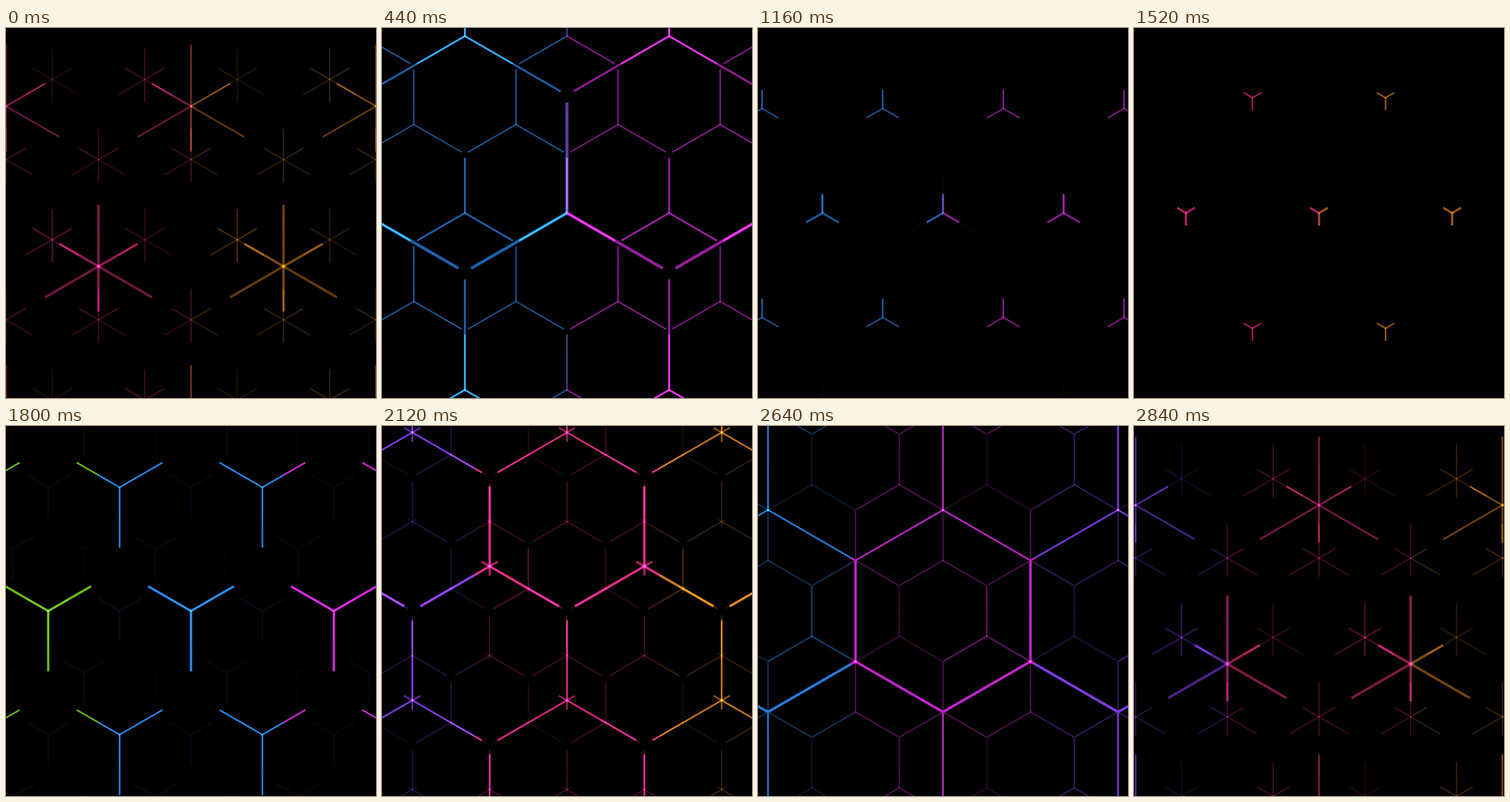
Write an HTML page with a canvas that moves like this. It is 500 px wide and 500 px high and loops after 2880 ms.

```html
<!DOCTYPE html>
<html lang="en">
<head>
<meta charset="utf-8">
<title>Honeycomb zoom</title>
<style>
  html, body { margin: 0; width: 100%; height: 100%; overflow: hidden; background: #000; }
  canvas { display: block; width: 500px; height: 500px; }
</style>
</head>
<body>
<canvas id="stage" width="500" height="500"></canvas>
<script>
const ctx = document.getElementById('stage').getContext('2d');
const SIZE = 500, MID = 250, STEP = 40, STEPS = 72;
const COLORS = ['#6cbc1e', '#2a8aee', '#d42adc', '#8c42fa', '#ee2e8c', '#d47e1c'];
const C = Math.sqrt(3) / 2;

// Arms of a node: the first three point up and down-sideways, the rest mirror them.
const ARMS = [[0, -1], [-C, .5], [C, .5], [0, 1], [-C, -.5], [C, -.5]];

const SPACING = [[0, 250], [11, 276], [29, 326], [45, 386], [53, 418], [66, 473], [72, 500]];
const HUE = [[0, 4], [11, 7], [29, 13], [45, 18.5], [53, 21.5], [66, 25.5], [71, 27.5], [72, 28]];
const FADE = [[92, 0], [97, .12], [104, .34], [118, .5], [125, .56], [138, .76], [163, .96],
  [193, 1], [240, 1], [276, .72], [326, .05], [334, 0]];
const LEVEL = [[0, .64], [11, 1], [53, 1], [66, .9], [72, .64]];

const clamp = v => Math.max(0, Math.min(1, v));

function track(points, x) {
  if (x <= points[0][0]) return points[0][1];
  for (let i = 1; i < points.length; i++) {
    const [x0, y0] = points[i - 1], [x1, y1] = points[i];
    if (x <= x1) return y0 + (y1 - y0) * (x - x0) / (x1 - x0);
  }
  return points[points.length - 1][1];
}

// Hard colour bands, 250 px wide, that jump in half-band steps.
function bands(n) {
  const shift = Math.floor(2 * track(HUE, n) + .01) / 2;
  const paint = ctx.createLinearGradient(0, 0, SIZE, 0);
  const first = Math.floor(shift);
  for (let i = first; i < first + 3; i++) {
    const a = clamp((i - shift) / 2), b = clamp((i + 1 - shift) / 2);
    if (b <= a) continue;
    const color = COLORS[i % 6];
    paint.addColorStop(a, color);
    paint.addColorStop(b, color);
  }
  return paint;
}

// Three turns of the net: old arms retract while the mirrored ones grow.
function pose(n) {
  if (n >= 51.5 && n < 65.9) {
    const u = (n - 51.5) / 14.4;
    return { origin: 1, back: 1 - u, side: u, down: u };
  }
  if (n >= 65.9 || n < 8.3) {
    const u = ((n < 20 ? n + STEPS : n) - 65.9) / 14.4;
    return { origin: -1, back: 1 - u, side: u, down: u };
  }
  const grow = clamp((n - 36) / 15);
  return { origin: 0, back: 1 - clamp((n - 9.3) / 27), side: grow, down: clamp(grow * 1.22) };
}

function line(x, y, arm, len, width, alpha) {
  ctx.beginPath();
  ctx.moveTo(x, y);
  ctx.lineTo(x + arm[0] * len, y + arm[1] * len);
  ctx.lineWidth = width * 1.7;
  ctx.globalAlpha = alpha * .3;
  ctx.stroke();
  ctx.lineWidth = width;
  ctx.globalAlpha = alpha * .75;
  ctx.stroke();
}

function net(d, p, level) {
  const alpha = track(FADE, d) * level;
  if (alpha < .01) return;
  const side = d / Math.sqrt(3), rows = Math.ceil(MID / (d * C)) + 2;
  const base = (1.1 + .0065 * (d - 110)) * (.65 + .35 * level);
  const dim = .5 + .5 * clamp((d - 122) / 20);
  const lens = [p.back, p.back, p.back, p.down, p.side, p.side];
  for (let j = -rows; j <= rows; j++) {
    const dy = p.origin * side + j * d * C;
    const width = base * (Math.abs(dy) < side * .75 ? 1.5 : 1);
    const reach = Math.ceil(MID / d) + 2, skew = Math.floor(j / 2);
    for (let i = -reach - skew; i <= reach - skew; i++) {
      const x = MID + (i + j / 2) * d, y = MID + dy;
      const weight = alpha * (i % 2 && j % 2 ? dim : 1);
      ARMS.forEach((arm, k) => {
        const len = lens[k];
        if (len < .005) return;
        const glow = k === 0 ? .75 + .25 * len : k < 3 ? .52 + .48 * len : Math.min(1, .6 + .9 * len);
        line(x, y, arm, len * side, width, weight * glow);
      });
    }
  }
}

function draw(ms) {
  const n = Math.floor(ms / STEP) % STEPS;
  const d = track(SPACING, n), p = pose(n), level = track(LEVEL, n);
  ctx.globalCompositeOperation = 'source-over';
  ctx.globalAlpha = 1;
  ctx.fillStyle = '#000';
  ctx.fillRect(0, 0, SIZE, SIZE);
  ctx.globalCompositeOperation = 'lighter';
  ctx.strokeStyle = bands(n);
  for (let k = 0; k < 3; k++) net(d / 2 ** k, p, level);
}

const start = performance.now();
function tick() {
  draw(performance.now() - start);
  requestAnimationFrame(tick);
}
tick();
</script>
</body>
</html>
```
